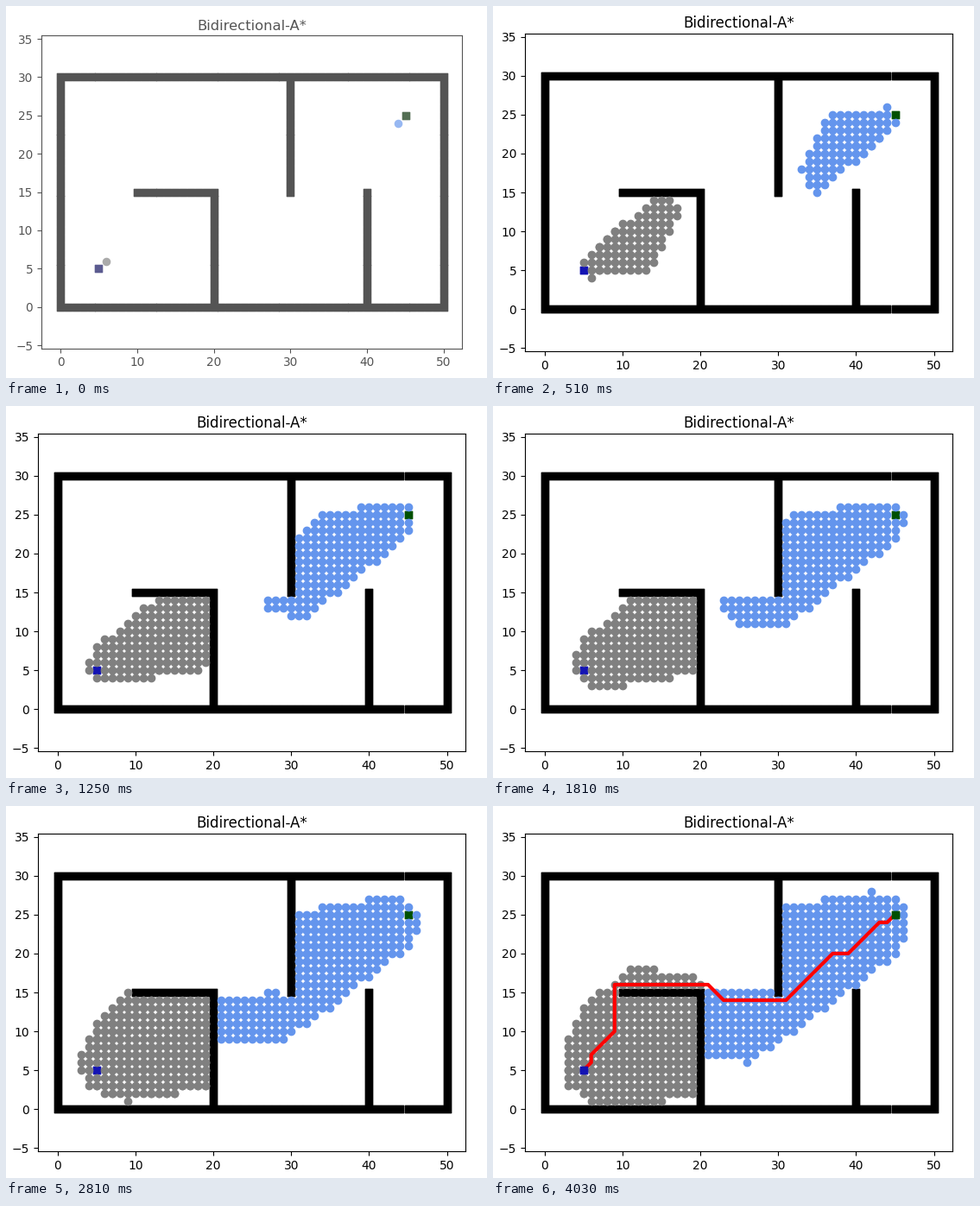
A matplotlib script for the animation above (4910 ms loop, 557 by 431 pixels).

```python
import math

import matplotlib.pyplot as plt
import numpy as np
from matplotlib.animation import FuncAnimation
from matplotlib.patches import Rectangle

W, H, DPI = 557, 431, 100
LOOP, TICK = 4910, 10
START, GOAL = (5, 5), (45, 25)
START_RGB = np.array([20, 20, 180]) / 255
GOAL_RGB = np.array([0, 80, 0]) / 255

# Axes box in pixels (from the bottom left) and the centre of the opening zoom
LEFT, BOTTOM, WIDTH, HEIGHT = 37.05, 31, 495.2, 368
CX, CY = 277, H - 190
CELL = 9.02

# Batch k of ten cells per side appears at DELAY * k + SLOWDOWN * k**2 ms
DELAY, SLOWDOWN = 47, 1.55
LAST = 38


def build_walls():
    cells = {(x, y) for x in range(51) for y in (0, 30)}
    cells |= {(x, y) for x in (0, 50) for y in range(31)}
    cells |= {(x, 15) for x in range(10, 21)}
    cells |= {(x, y) for x in (20, 40) for y in range(16)}
    cells |= {(30, y) for y in range(15, 30)}
    return cells


def trace(parent, cell):
    """Cells from the given one back to the root of its tree."""
    chain = [cell]
    while parent[cell] != cell:
        cell = parent[cell]
        chain.append(cell)
    return chain


def search(walls):
    """Bidirectional A*: cells closed from each end, and the path found."""
    ends = (START, GOAL)
    steps = (-1, 0, 1)
    cost = [{end: 0.0} for end in ends]
    parent = [{end: end} for end in ends]
    queue = [[(0.0, end)] for end in ends]
    closed = [[], []]
    while True:
        for i in (0, 1):
            item = min(queue[i])
            queue[i].remove(item)
            x, y = cell = item[1]
            if cell in cost[1 - i]:
                fore, back = (trace(p, cell) for p in parent)
                return (*(np.array(c[1:]) for c in closed),
                        fore[::-1] + back[1:])
            closed[i].append(cell)
            tx, ty = ends[1 - i]
            for dx, dy in ((a, b) for a in steps for b in steps if a or b):
                nxt = (x + dx, y + dy)
                if walls & {nxt, (x + dx, y), (x, y + dy)}:
                    continue
                g = cost[i][cell] + math.hypot(dx, dy)
                if g < cost[i].get(nxt, math.inf):
                    cost[i][nxt] = g
                    parent[i][nxt] = cell
                    h = math.hypot(tx - nxt[0], ty - nxt[1])
                    queue[i].append((g + h, nxt))


WALLS = build_walls()
FORE, BACK, PATH = search(WALLS)

fig = plt.figure(figsize=((W + 0.01) / DPI, (H + 0.01) / DPI), dpi=DPI,
                 facecolor="white")
ax = fig.add_axes([0, 0, 1, 1])
half = HEIGHT / 2 / CELL
ax.set(xlim=(-2.5, WIDTH / CELL - 2.5), ylim=(15 - half, 15 + half),
       xticks=range(0, 51, 10), yticks=range(-5, 36, 5))
title = ax.set_title("Bidirectional-A*", pad=5)


def markers(cells, shape, color):
    return ax.scatter(*zip(*cells), marker=shape, color=color, linewidths=1,
                      snap=False)


start = markers([START], "s", "blue")
goal = markers([GOAL], "s", "green")
wall = markers(sorted(WALLS), "s", "black")
fore = markers([START], "o", "gray")
back = markers([GOAL], "o", "cornflowerblue")
path, = ax.plot(*zip(*PATH), color="red", linewidth=3)
veil = Rectangle((0, 0), 1, 1, transform=fig.transFigure, color="white",
                 linewidth=0, zorder=10)
fig.add_artist(veil)


def set_zoom(s):
    ax.set_position([(CX + (LEFT - CX) * s) / W, (CY + (BOTTOM - CY) * s) / H,
                     WIDTH * s / W, HEIGHT * s / H])
    ax.tick_params(labelsize=10 * s, length=3.5 * s, pad=3.5 * s)
    title.set_fontsize(12 * s)
    for group in (start, goal, wall, fore, back):
        group.set_sizes([(6 * s) ** 2], DPI)


def step_at(t):
    root = math.sqrt(DELAY ** 2 + 4 * SLOWDOWN * t)
    return min(LAST, int((root - DELAY) / (2 * SLOWDOWN)))


def draw(i):
    step = step_at(i * TICK)
    done = step == LAST
    count = 10 * step + 1
    fade = 0.32 ** step
    set_zoom(1 - 0.0156 * fade ** 2)
    veil.set_alpha(fade / 3)
    fore.set_offsets(FORE[:count])
    back.set_offsets(BACK[:count])
    for end, rgb in ((start, START_RGB), (goal, GOAL_RGB)):
        end.set_color([tuple(rgb * (1 - fade / 2))])
        end.set_zorder(3 if done else 1)
    path.set_visible(done)
    return fore, back, start, goal, path, veil


anim = FuncAnimation(fig, draw, frames=LOOP // TICK, interval=TICK,
                     repeat=True, repeat_delay=0, blit=False)
plt.show()
```
